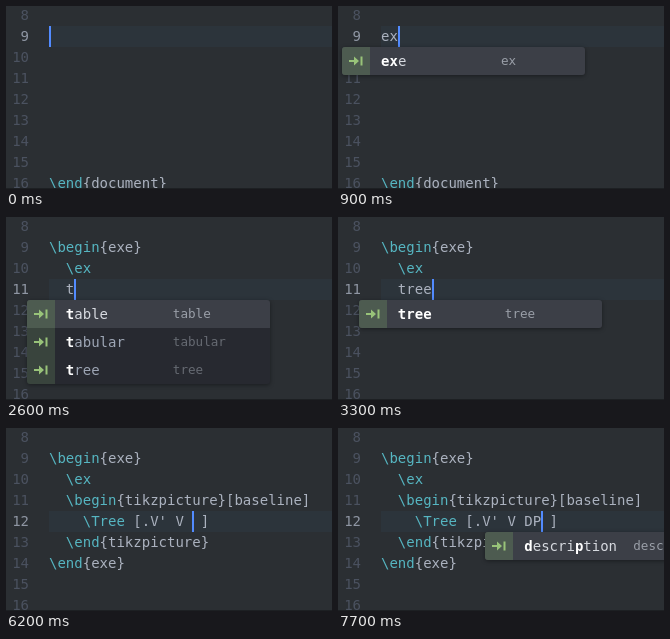
Recreate the animation shown at these times as an HTML page. Size 326 by 183 pixels, loop 8.1 s.

```html
<!DOCTYPE html>
<html lang="en">
<head>
<meta charset="utf-8">
<title>Snippet completion</title>
<style>
  html, body { margin: 0; width: 100%; height: 100%; overflow: hidden; background: #2b2f33; }
  #stage {
    position: relative; width: 326px; height: 183px; overflow: hidden;
    background: #2b2f33; color: #abb2bf;
    font: 14px/21px "DejaVu Sans Mono", monospace; white-space: pre;
  }
  #stage div { position: absolute; }
  .number { left: 0; width: 23px; text-align: right; color: #4b5260; }
  .number.active { color: #8f96a3; }
  .line { left: 43px; right: 0; height: 21px; }
  .line.active { background: #2c343b; }
  .command { color: #56b6c2; }
  .cursor { width: 2px; height: 21px; background: #528bff; }
  .popup { background: #272930; border-radius: 3px; overflow: hidden; box-shadow: 0 1px 4px rgba(0, 0, 0, .4); }
  .item { left: 0; right: 0; height: 28px; line-height: 28px; color: #9da5b4; }
  .item.selected { background: #3c3f47; color: #d7dae0; }
  .icon { left: 0; top: 0; width: 28px; height: 28px; background: #39443d; }
  .selected .icon { background: #4d5b50; }
  .icon svg { display: block; }
  .word { left: 39px; top: 0; }
  .word b { color: #fff; }
  .label { top: 0; font-size: 12.6px; color: #666a72; }
  .selected .label { color: #9a9fa8; }
  .edge { left: 0; top: 182px; width: 326px; height: 1px; background: #1d2023; }
</style>
</head>
<body>
<div id="stage"></div>
<script>
const LOOP = 8100, FIRST_LINE = 8, ROW = 21, ITEM = 28;
const stage = document.getElementById('stage');
const top_ = line => (line - FIRST_LINE) * ROW - 1;

// Documents start at line 9; each takes the text of the line being typed.
const plain = text => [text, '', '', '', '', '', '', '\\end{document}'];
const example = (...body) => ['\\begin{exe}', '  \\ex ', ...body, '\\end{exe}'];
const tree = text => example('  \\begin{tikzpicture}[baseline]',
  '    \\Tree [.' + text + ']', '  \\end{tikzpicture}');

const entries = {
  exe: 'ex', enumerate: 'enum', equation: 'eq', emph: 'em',
  table: 'table', tabular: 'tabular', tree: 'tree', description: 'desc'
};
const popup = (query, col, labelX, words, width = 243) => ({ query, col, labelX, words, width });
const exePopup = (query, ...words) => popup(query, 0, 159, words);
const treePopup = (query, ...words) => popup(query, 2, 146, words);
const listPopup = query => popup(query, 17, 148, ['description'], 260);

const states = [];
const at = (time, lines, line, col, menu) => states.push({ time, lines, line, col, menu, cursor: true });
const blink = time => {
  const last = states[states.length - 1];
  states.push({ ...last, time, cursor: !last.cursor });
};

at(0, plain(''), 9, 0);
at(400, plain('e'), 9, 1, exePopup('e', 'exe', 'enumerate', 'equation', 'emph'));
blink(700);
at(900, plain('ex'), 9, 2, exePopup('ex', 'exe'));
at(1200, plain('exe'), 9, 3, exePopup('ex', 'exe'));
at(1500, plain('exe'), 9, 3, exePopup('exe', 'exe'));
at(1600, example(), 10, 6);
blink(1800);
blink(2300);
at(2400, example('  '), 11, 2);
at(2600, example('  t'), 11, 3, treePopup('t', 'table', 'tabular', 'tree'));
at(2900, example('  tr'), 11, 4, treePopup('tr', 'tree', 'tabular'));
at(3100, example('  tre'), 11, 5, treePopup('tr', 'tree', 'tabular'));
at(3300, example('  tree'), 11, 6, treePopup('tree', 'tree'));
at(3600, tree('   '), 12, 12);
blink(3900);
at(4400, tree('V   '), 12, 13);
blink(4600);
at(4800, tree("V'   "), 12, 14);
blink(5100);
at(5200, tree("V'   "), 12, 15);
at(5800, tree("V' V  "), 12, 16);
blink(6100);
at(6200, tree("V' V  "), 12, 17);
at(6800, tree("V' V D "), 12, 18, listPopup('d'));
at(7000, tree("V' V DP "), 12, 19, listPopup('dp'));
blink(7300);
blink(7700);

const box = (name, style, content = '') => `<div class="${name}" style="${style}">${content}</div>`;
const colour = text => text.replace(/\\\w+/g, '<span class="command">$&</span>');

function markMatches(word, query) {
  let i = 0;
  return [...word].map(c => c === query[i] ? (i++, `<b>${c}</b>`) : c).join('');
}

const icon = `<svg width="28" height="28" fill="#98c379">
  <path d="M7 13h5v-3.500l5 4.500-5 4.500v-3.500h-5zM18.500 9.500h2v9h-2z"/></svg>`;

function drawPopup({ query, col, labelX, words, width }, line) {
  const items = words.map((word, i) => box('item' + (i ? '' : ' selected'), `top:${i * ITEM}px`,
    box('icon', '', icon) + box('word', '', markMatches(word, query)) +
    box('label', `left:${labelX}px`, entries[word]))).join('');
  return box('popup', `left:calc(4px + ${col}ch);top:${top_(line + 1)}px;` +
    `width:${width}px;height:${words.length * ITEM}px`, items);
}

function draw({ lines, line, col, menu, cursor }) {
  let html = '';
  for (let n = FIRST_LINE; n <= 16; n++) {
    const active = n === line ? ' active' : '', y = `top:${top_(n)}px`;
    html += box('number' + active, y, n) + box('line' + active, y, colour(lines[n - 9] || ''));
  }
  if (cursor) html += box('cursor', `left:calc(43px + ${col}ch);top:${top_(line)}px`);
  if (menu) html += drawPopup(menu, line);
  stage.innerHTML = html + box('edge', '');
}

let shown;
const start = performance.now();
function tick() {
  const time = (performance.now() - start) % LOOP;
  const state = states.filter(s => s.time <= time).pop() || states[0];
  if (state !== shown) draw(shown = state);
  requestAnimationFrame(tick);
}
tick();
</script>
</body>
</html>
```
